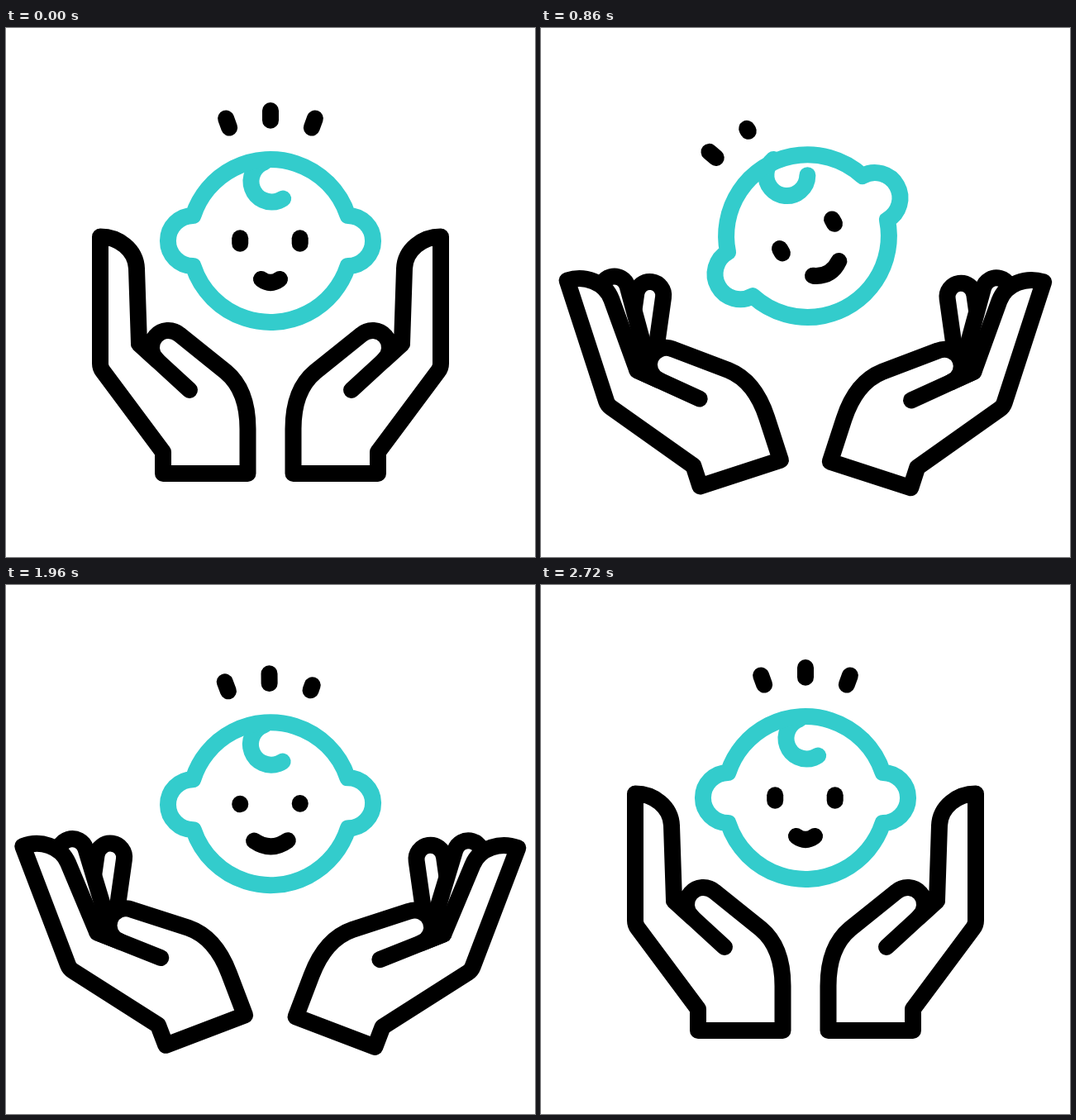
An HTML page with a canvas for the animation above (3020 ms loop, 640 by 640 pixels).

```html
<!DOCTYPE html>
<html lang="en">
<head>
<meta charset="utf-8">
<title>Child care</title>
<style>
html, body { margin: 0; width: 100%; height: 100%; overflow: hidden; background: #fff; }
canvas { display: block; width: 640px; height: 640px; }
</style>
</head>
<body>
<canvas id="stage" width="640" height="640"></canvas>
<script>
const ctx = document.getElementById('stage').getContext('2d');
const LOOP = 3020, END = 2720, STEP = 20;
const TEAL = '#33cccc', BLACK = '#000';
const RAD = Math.PI / 180;
const SWAYS = [0, 880, 1230, 1700, 2200, END];
const HOPS = [0, 520, 1180, 1470, 1840, 2140];

const clamp = v => Math.min(1, Math.max(0, v));
const ramp = (t, start, length) => clamp((t - start) / length);
const mix = (a, b, k) => a + (b - a) * k;
const easeOut = u => Math.sin(u * Math.PI / 2);
const easeInOut = u => (1 - Math.cos(u * Math.PI)) / 2;

// Swings to alternate sides at each beat, fading by a power of the beat's index.
function swing(t, beats, fade) {
  const last = beats.length - 1;
  const peak = n => n % last ? (-1) ** n / n ** fade : 0;
  let n = 1;
  while (n < last && t > beats[n]) n++;
  return mix(peak(n - 1), peak(n), easeInOut(ramp(t, beats[n - 1], beats[n] - beats[n - 1])));
}

const hand = new Path2D('M114 252.5V406Q114 411 117 415L190 513V539H292.5V485' +
  'C292.5 455 284 431 266 416L210 371A20.2 20.2 0 0 0 183 402' +
  'L161 382L158 291C157 268 136 252.5 114 252.5Z');
const palm = new Path2D('M161 382L222 438');

function line(x1, y1, x2, y2) {
  ctx.beginPath();
  ctx.moveTo(x1, y1);
  ctx.lineTo(x2, y2);
  ctx.stroke();
}

function drawFinger(x, angle, length, half) {
  ctx.save();
  ctx.translate(x, 385);
  ctx.rotate(angle * RAD);
  ctx.beginPath();
  ctx.moveTo(-half, 0);
  ctx.arc(0, -length, half, Math.PI, 0);
  ctx.lineTo(half, 0);
  ctx.fill();
  ctx.stroke();
  ctx.restore();
}

function drawHand(open, mirrored) {
  const px = mirrored ? 246 : 240;
  ctx.save();
  if (mirrored) {
    ctx.translate(640, 0);
    ctx.scale(-1, 1);
  }
  ctx.translate(px, 539);
  ctx.rotate(-22 * open * RAD);
  ctx.translate(-px, -539);
  ctx.strokeStyle = BLACK;
  ctx.fillStyle = '#fff';
  if (open > 0) {
    const fan = Math.sqrt(open);
    const half = mix(12, 17, fan);
    drawFinger(mix(157, 163, fan), mix(-12, 30, fan), 94, half);
    drawFinger(mix(156, 160, fan), mix(-13, 4.5, fan), 104, half);
  }
  ctx.fill(hand);
  ctx.stroke(hand);
  ctx.stroke(palm);
  ctx.restore();
}

// Each mark grows outward from its inner end and later leaves by its outer end.
function drawMark(i, t) {
  const grow1 = 722 + 95 * i, grow2 = 1450 + 200 * i;
  let from = 0, to = 1;
  if (t < grow1) {
    from = ramp(t, 48 + 120 * i, 150);
  } else if (t < grow2) {
    to = ramp(t, grow1, 150);
    from = ramp(t, 922 + 120 * i, 150);
  } else {
    to = ramp(t, grow2, 200);
  }
  if (to - from < 0.02) return;
  ctx.save();
  ctx.rotate((i - 1) * 20 * RAD);
  line(0, -145.7 - 11.8 * from, 0, -145.7 - 11.8 * to);
  ctx.restore();
}

function drawHair(t, sway) {
  const turn = 20 * swing(t, SWAYS, 1.2) * RAD;
  const curl = 57 * (1 - Math.max(0, -sway) ** 1.4);
  ctx.save();
  ctx.rotate(turn);
  ctx.beginPath();
  ctx.arc(1.5, -72 - (57 - curl) * 0.1, 25, 250 * RAD, curl * RAD - turn, true);
  ctx.stroke();
  ctx.restore();
}

function drawSkull() {
  const side = Math.asin(30.5 / 98.4);
  const earX = 98.4 * Math.cos(side);
  ctx.beginPath();
  ctx.arc(0, 0, 98.4, Math.PI + side, -side);
  ctx.arc(earX, 0, 30.5, -Math.PI / 2, Math.PI / 2);
  ctx.arc(0, 0, 98.4, side, Math.PI - side);
  ctx.arc(-earX, 0, 30.5, Math.PI / 2, Math.PI * 1.5);
  ctx.closePath();
  ctx.stroke();
}

function drawFace(t) {
  const eye = 3 * Math.cos(Math.PI * Math.min(t, 2400) / 800) ** 2 + 0.2;
  for (const x of [-36.8, 35.7]) line(x, -eye, x, eye);

  const grin = Math.sin(Math.PI * t / 1360) ** 4;
  const half = 11 + 10 * grin, y = 46.5 - 2 * grin;
  ctx.beginPath();
  ctx.moveTo(-half, y);
  ctx.quadraticCurveTo(0, y + 8 + 6.5 * grin, half, y);
  ctx.stroke();
}

function drawHead(t) {
  const sway = swing(t, SWAYS, 2);
  ctx.save();
  ctx.translate(320 - 2.5 * sway, 257.5 + 33.5 * swing(t, HOPS, 0.8));
  ctx.strokeStyle = TEAL;
  drawHair(t, sway);
  ctx.rotate(29.5 * sway * RAD);
  drawSkull();
  ctx.strokeStyle = BLACK;
  drawFace(t);
  for (let i = 0; i < 3; i++) drawMark(i, t);
  ctx.restore();
}

function draw(t) {
  ctx.fillStyle = '#fff';
  ctx.fillRect(0, 0, 640, 640);
  ctx.lineWidth = 20;
  ctx.lineCap = ctx.lineJoin = 'round';
  const open = easeOut(ramp(t, 405, 745)) - easeOut(ramp(t, 1935, 745));
  drawHand(open, false);
  drawHand(open, true);
  drawHead(t);
}

const begin = performance.now();
function tick() {
  const t = (performance.now() - begin) % LOOP;
  draw(Math.min(END, Math.floor(t / STEP) * STEP));
  requestAnimationFrame(tick);
}
tick();
</script>
</body>
</html>
```
